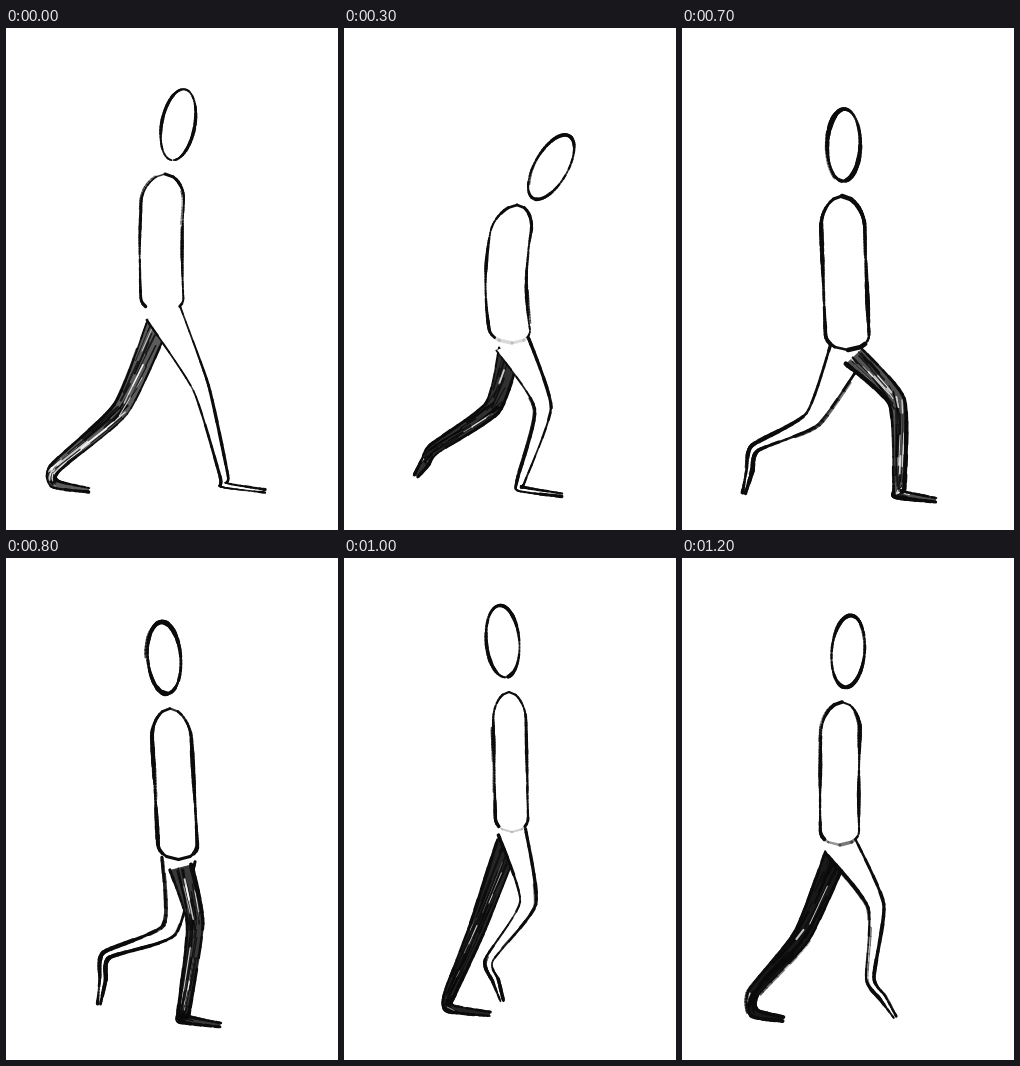
An HTML page with a canvas for the animation above (1.3 s loop, 332 px wide and 502 px high).

```html
<!DOCTYPE html>
<html lang="en">
<head>
<meta charset="utf-8">
<title>Walk cycle</title>
<style>
  html, body { margin: 0; width: 100%; height: 100%; overflow: hidden; background: #fff; }
  canvas { display: block; width: 332px; height: 502px; }
</style>
</head>
<body>
<canvas id="stage"></canvas>
<script>
const W = 332, H = 502, STEP = 100, COUNT = 13;
const canvas = document.getElementById('stage');
const ctx = canvas.getContext('2d');
const dpr = window.devicePixelRatio || 1;
canvas.width = W * dpr;
canvas.height = H * dpr;
ctx.scale(dpr, dpr);
ctx.lineCap = ctx.lineJoin = 'round';

// Key poses: lean of the neck in degrees, and the joints. Legs run knee, ankle, toe.
const poses = [];
poses[0] = { lean: 15, pen: 2.6, tone: 0.68, neck: [159, 146], hip: [157, 284],
  near: [[195, 360], [218, 448], [259, 463]], far: [[115, 381], [49, 440], [83, 462]] };
poses[3] = { lean: 42, pen: 2.8, tone: 0.86, neck: [173, 177], hip: [168, 315],
  near: [[199, 380], [177, 453], [218, 467]], far: [[148, 380], [90, 421], [72, 448]] };
poses[5] = { lean: 44, pen: 2.7, tone: 0.9, neck: [168, 164], hip: [161, 310],
  near: [[133, 384], [82, 438], [117, 462]], far: [[206, 362], [174, 423], [207, 454]] };
poses[7] = { lean: 2, pen: 3.7, tone: 0.72, neck: [160, 168], hip: [166, 322],
  near: [[130, 391], [73, 420], [62, 465]], far: [[215, 374], [217, 458], [254, 472]] };
poses[9] = { lean: -15, pen: 3.7, tone: 0.93, neck: [168, 133], hip: [179, 281],
  near: [[196, 353], [128, 374], [124, 427]], far: [[163, 358], [139, 447], [175, 462]] };
poses[10] = { lean: -7, pen: 2.9, tone: 0.91, neck: [165, 134], hip: [168, 274],
  near: [[184, 345], [145, 402], [158, 443]], far: [[134, 368], [106, 435], [146, 456]] };
poses[12] = { lean: 7, pen: 3.1, tone: 0.96, neck: [160, 144], hip: [158, 287],
  near: [[194, 348], [188, 420], [213, 459]], far: [[120, 378], [72, 434], [101, 461]] };

function blend(a, b, t) {
  if (typeof a === 'number') return a + (b - a) * t;
  if (Array.isArray(a)) return a.map((v, i) => blend(v, b[i], t));
  return Object.fromEntries(Object.keys(a).map(k => [k, blend(a[k], b[k], t)]));
}

// Held drawings between the keys
for (let i = 0; i < COUNT; i++) {
  if (poses[i]) continue;
  let next = i + 1;
  while (!poses[next]) next++;
  poses[i] = blend(poses[i - 1], poses[next], 1 / (next - i + 1));
}
// Half a cycle on, the far leg repeats the near leg's heel strike
poses[6].far = poses[0].near.map(([x, y]) => [x + 14, y]);

let seed = 1;
function rand() {
  seed = (seed * 16807) % 2147483647;
  return seed / 2147483647;
}

// Soft spline through points, 10 samples per span
function curve(p) {
  const out = [], at = i => p[Math.max(0, Math.min(p.length - 1, i))];
  for (let i = 0; i < p.length - 1; i++) {
    const [a, b, c, d] = [at(i - 1), at(i), at(i + 1), at(i + 2)];
    for (let k = 0; k < 10; k++) {
      const t = k / 10, u = 1 - t;
      out.push([0, 1].map(n => {
        const q = b[n] + (c[n] - a[n]) * 0.1, r = c[n] - (d[n] - b[n]) * 0.1;
        return u * u * u * b[n] + 3 * u * u * t * q + 3 * u * t * t * r + t * t * t * c[n];
      }));
    }
  }
  out.push(p[p.length - 1]);
  return out;
}

function line(a, b, width, color) {
  ctx.strokeStyle = color;
  ctx.lineWidth = width;
  ctx.beginPath();
  ctx.moveTo(...a);
  ctx.lineTo(...b);
  ctx.stroke();
}

// Brush line whose pressure rises and falls; light spots turn grey
function brush(pts, width, force = 1) {
  const phase = rand() * 6, rate = 0.16 + rand() * 0.12;
  for (let i = 1; i < pts.length; i++) {
    const press = 0.92 + 0.28 * Math.sin(i * rate + phase) + 0.25 * (rand() - 0.5);
    const alpha = Math.min(1, force * (0.3 + press));
    line(pts[i - 1], pts[i], width * press, `rgba(12,12,12,${alpha})`);
  }
}

// Main line with a few loose strokes beside it
function ink(pts, width, force = 1) {
  brush(pts, width, force);
  for (let k = 0; k < 2; k++) {
    const from = Math.floor(rand() * pts.length * 0.7);
    const dx = (rand() - 0.5) * 4, dy = (rand() - 0.5) * 2;
    const part = pts.slice(from, from + Math.ceil(pts.length / 4));
    brush(part.map(([x, y]) => [x + dx, y + dy]), width * 0.5, force * 0.5);
  }
}

function fill(a, b, color) {
  ctx.fillStyle = color;
  ctx.beginPath();
  a.concat(b.slice().reverse()).forEach(p => ctx.lineTo(...p));
  ctx.fill();
}

// A foot longer than it is high stands on its heel, otherwise it hangs
function heel([ax, ay], [tx, ty]) {
  return tx - ax > ty - ay ? [ax, Math.max(ay, ty - 6)] : blend([ax, ay], [tx, ty], 0.5);
}

// Both edges of a limb, set off from its joints
function edges(joints, widths) {
  const side = sign => curve(joints.map(([x, y], i) => {
    const unit = (a, b) => {
      const dx = b[0] - a[0], dy = b[1] - a[1], n = Math.hypot(dx, dy) || 1;
      return [dx / n, dy / n];
    };
    const u = unit(joints[Math.max(0, i - 1)], joints[i]);
    const v = unit(joints[i], joints[i + 1] || joints[i]);
    const dx = u[0] + v[0], dy = u[1] + v[1], n = Math.hypot(dx, dy) || 1;
    return [x + sign * widths[i] * dy / n, y - sign * widths[i] * dx / n];
  }));
  return [side(1), side(-1)];
}

function hatch(a, b, tone) {
  for (let k = 0; k < 70; k++) {
    const i = Math.floor(rand() * (a.length - 12));
    const j = i + 2 + Math.floor(rand() * 4), u = 0.12 + rand() * 0.68;
    const color = rand() < tone ? 'rgba(10,10,10,0.8)' : 'rgba(255,255,255,0.75)';
    line(blend(a[i], b[i], u), blend(a[j], b[j], u + 0.08), 0.8 + rand() * 1.3, color);
  }
}

function leg(p, name, girth) {
  const [knee, ankle, toe] = p[name], far = name === 'far';
  const top = far ? blend(p.hip, knee, 0.12) : p.hip;
  const widths = far ? [11, 8, 5.5, 4.5, 2] : [girth * 0.85, 8, 4, 3, 1.5];
  const [a, b] = edges([top, knee, ankle, heel(ankle, toe), toe], widths);
  const v = far ? Math.round(255 - 240 * p.tone) : 255;
  fill(a, b, `rgb(${v},${v},${v})`);
  if (far) hatch(a, b, p.tone);
  ink(a, p.pen);
  ink(b, p.pen);
}

function torso(p, girth) {
  const bow = -0.2 * Math.max(0, p.lean);
  const mid = blend(p.neck, p.hip, 0.5);
  const bend = [mid[0] + 2 * bow, mid[1]];
  const side = sign => Array.from({ length: 51 }, (_, i) => {
    const t = i / 50;
    const [x, y] = blend(blend(p.neck, bend, t), blend(bend, p.hip, t), t);
    const shoulder = Math.sqrt(Math.sin(Math.min(1, t / 0.2) * Math.PI / 2));
    const seat = Math.sqrt(1 - Math.max(0, (t - 0.9) / 0.1) ** 2);
    return [x + sign * girth * shoulder * seat, y];
  });
  const a = side(-1), b = side(1), press = Math.min(1, Math.max(0, p.pen - 2.7));
  fill(a, b, '#fff');
  [a, b].forEach(s => {
    ink(s.slice(0, 49), p.pen);
    if (press > 0.05) brush(s.slice(48), p.pen, press);
  });
}

function head(p) {
  const r = p.lean * Math.PI / 180, tilt = r * 0.72, pts = [];
  const cx = p.neck[0] + 51 * Math.sin(r), cy = p.neck[1] - 51 * Math.cos(r);
  for (let i = 0; i <= 60; i++) {
    const t = Math.PI / 2 + i / 60 * 6.15;
    const x = 16.5 * Math.cos(t), y = 36 * Math.sin(t);
    pts.push([cx + x * Math.cos(tilt) - y * Math.sin(tilt),
      cy + x * Math.sin(tilt) + y * Math.cos(tilt)]);
  }
  ink(pts, p.pen * 1.1);
}

function draw(step) {
  const p = poses[step];
  seed = 811 + step * 9701;
  ctx.fillStyle = '#fff';
  ctx.fillRect(0, 0, W, H);
  // A wide stride shows a broader body
  const girth = 16 + 0.03 * Math.abs(p.near[2][0] - p.far[2][0]);
  const order = p.far[0][0] < p.near[0][0] ? ['far', 'near'] : ['near', 'far'];
  order.forEach(name => leg(p, name, girth));
  torso(p, girth);
  head(p);
}

let start = null, shown = 0;
function tick(now) {
  if (start === null) start = now;
  const step = Math.floor((now - start) / STEP) % COUNT;
  if (step !== shown) draw(shown = step);
  requestAnimationFrame(tick);
}
draw(0);
requestAnimationFrame(tick);
</script>
</body>
</html>
```
